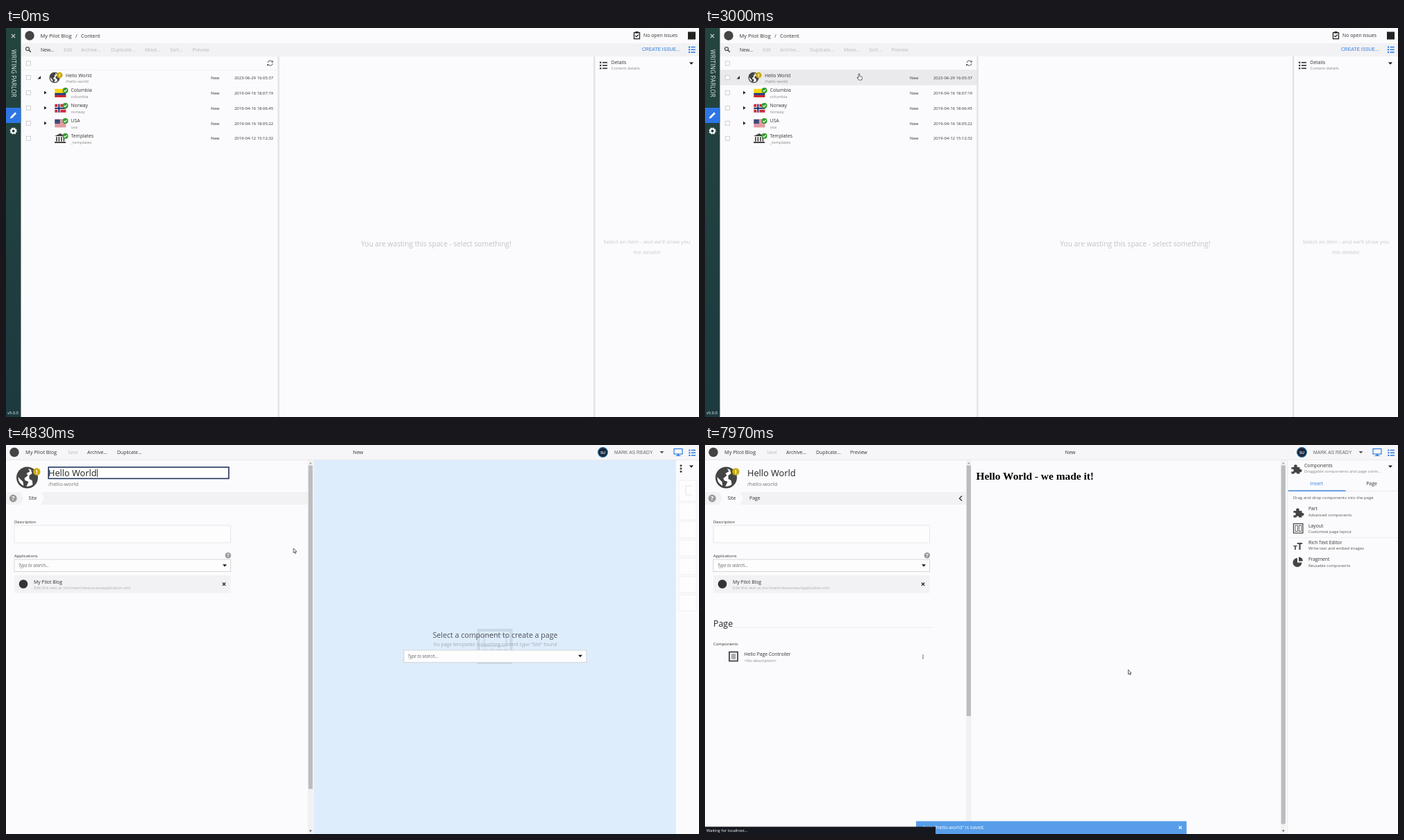
These frames come from a looping animation (998x561 px, 8 s). An HTML page:

```html
<!DOCTYPE html>
<html lang="en">
<head>
<meta charset="utf-8">
<title>Editing a page</title>
<style>
html, body { margin: 0; width: 100%; height: 100%; overflow: hidden; background: #fbfbfd; }
svg { display: block; width: 100vw; height: 100vh; }
text { font-family: "Open Sans", sans-serif; white-space: pre; }
</style>
</head>
<body>
<svg id="stage" viewBox="0 0 998 561"></svg>
<script>
const LOOP = 8000;
const BG = '#fbfbfd', BAR = '#f2f2f4', INK = '#333', DARK = '#444', MUTED = '#888', PALE = '#bbb', BLUE = '#2f7de1';
const SITE = 'My Pilot Blog';

// Markup helpers
const rect = (x, y, w, h, fill, more = '') => `<rect x="${x}" y="${y}" width="${w}" height="${h}" fill="${fill}" ${more}/>`;
const box = (x, y, w, h, stroke = '#ccc', fill = '#fdfdfe', sw = 0.8) => rect(x, y, w, h, fill, `stroke="${stroke}" stroke-width="${sw}"`);
const circle = (x, y, r, fill, more = '') => `<circle cx="${x}" cy="${y}" r="${r}" fill="${fill}" ${more}/>`;
const path = (d, fill = 'none', more = '') => `<path d="${d}" fill="${fill}" ${more}/>`;
const line = (d, stroke, w = 1) => path(d, 'none', `stroke="${stroke}" stroke-width="${w}"`);
const text = (x, y, s, size = 6.8, fill = INK, more = '') =>
  `<text x="${x}" y="${y}" font-size="${size}" fill="${fill}" ${more}>${s.replace(/</g, '&lt;')}</text>`;
const mid = 'text-anchor="middle"', end = 'text-anchor="end"';
const at = (x, y, body, scale = 1) => `<g transform="translate(${x} ${y}) scale(${scale})">${body}</g>`;
const group = (id, body) => `<g id="${id}">${body}</g>`;
const two = (x, y, a, b, gap = 8.3) => text(x, y, a) + text(x, y + gap, b, 5.85, MUTED);
const caret = (x, y, fill = '#111') => path(`M${x - 3} ${y - 1.5}h6l-3 3.2z`, fill);
const cross = (x, y, c, r = 2.2) => line(`M${x - r} ${y - r}l${2 * r} ${2 * r}m0 ${-2 * r}l${-2 * r} ${2 * r}`, c, 1.2);
const help = (x, y, r) => circle(x, y, r, '#999') + text(x, y + r * 0.6, '?', r * 1.6, '#fff', mid + ' font-weight="700"');
const arial = `style="font-family:'Liberation Sans',sans-serif"`;

// Icons
const list = (x, y, c = DARK) => [0, 4.2, 8.4].map(d =>
  rect(x, y + d, 2.4, 2.4, c) + rect(x + 4, y + d + 0.3, 7, 1.8, c)).join('');
const globe = (x, y, r) => at(x, y,
  circle(0, 0, 14, '#fff', `stroke="${DARK}" stroke-width="2.6"`) +
  path('M-12 -7C-8 -13 -2 -14 1 -13L4 -9L-1 -6L1 -3L-4 1L-3 4L2 6L0 10L-2 14L-5 12L-6 6L-10 2L-13 -1Z', DARK) +
  path('M5 -12L12 -7L14 0L12 7L8 10L7 4L3 2L3 -3L7 -6Z', DARK), r / 15.3);
const warn = (x, y, r) => circle(x, y, r, '#c9a90b') + text(x, y + r * 0.62, '!', r * 1.7, '#fff', mid + ' font-weight="700"');
const tick = (x, y) => circle(x, y, 4, '#359c2d') + line(`M${x - 2} ${y}l1.5 1.6l2.7 -3`, '#fff', 1.1);
const doc = (x, y) => box(x - 6, y - 6.5, 12, 13, DARK, '#fff', 1.8) +
  line([-3, -1, 1, 3].map(d => `M${x - 3.3} ${y + d}h6.6`).join(''), DARK, 0.9);
const user = (x, y, r) => circle(x, y, r - 0.6, '#17283c', 'stroke="#2a6da0" stroke-width="1.2"') +
  text(x, y + 2, 'SU', 5.6, '#fff', mid + ' font-weight="600"');
const puzzle = (x, y) => at(x, y, path('M-6.5 -2h4a2.4 2.4 0 1 1 4 0h4v3a2.2 2.2 0 1 1 0 4v2.5h-4a2 2 0 1 0 -4 0h-4v-3.5a2 2 0 1 0 0 -3z', DARK));
const dots = (x, y, gap, r) => [-gap, 0, gap].map(d => circle(x, y + d, r, DARK)).join('');
const temple = (x, y) => at(x, y, path('M-8 -3L0 -7L8 -3Z', DARK) + rect(-8, 5, 16, 2, DARK) +
  [-6, -2.5, 1, 4.5].map(d => rect(d, -2, 1.7, 6.5, DARK)).join(''));
const flags = {
  columbia: rect(0, 0, 16, 12, '#f8d60e') + rect(0, 6, 16, 3, '#153a8c') + rect(0, 9, 16, 3, '#cb1c30'),
  norway: rect(0, 0, 16, 12, '#d3293d') + rect(4, 0, 4, 12, '#fff') + rect(0, 4, 16, 4, '#fff') +
    rect(5, 0, 2, 12, '#16316f') + rect(0, 5, 16, 2, '#16316f'),
  usa: rect(0, 0, 16, 12, '#f4eeee') + [0, 2, 4, 6, 8, 10].map(y => rect(0, y, 16, 1, '#cc4a58')).join('') + rect(0, 0, 7.5, 6, '#3b4878')
};

// Content list
const row = (y, name, key, date, icon, kind) => {
  const root = kind === 'root', x = root ? 86 : 93.5;
  const arrow = root ? path(`M50 ${y - 2.5}v4.5h-4.5z`, '#222') : kind === 'leaf' ? '' : path(`M55 ${y - 2.5}l3.6 2.5l-3.6 2.5z`, '#222');
  return box(29.3, y - 3, 6, 6, '#c4c4c8') + arrow + icon + two(x, y - 1, name, key) +
    text(295, y + 2.2, 'New', 5.9) + text(385, y + 2.2, date, 5.95, INK, end);
};
const country = (y, name, date) => {
  const key = name.toLowerCase();
  return row(y, name, key, date, at(70.3, y - 5.5, flags[key]) + tick(85.5, y - 3.3), 'node');
};
const tools = [[83, 'Edit'], [108, 'Archive...'], [151, 'Duplicate...'], [200, 'Move...'], [236.5, 'Sort...'], [268.5, 'Preview']];
const browse =
  rect(0, 0, 998, 561, BG) + rect(21, 22, 977, 19, BAR) + rect(0, 0, 21.5, 561, 'url(#side)') +
  cross(10.5, 11.5, '#ccd6d6', 2.6) +
  text(0, 0, 'WRITING PARLOR', 8.1, '#e8eeee', 'transform="translate(7.7 31) rotate(90)" letter-spacing=".25"') +
  rect(0, 115, 21.5, 22, '#2d76e4') +
  path('M6 130.5l.7 -2.6l6.4 -6.4l2 2l-6.4 6.4z', '#fff') +
  circle(10.7, 148.5, 3, 'none', 'stroke="#fff" stroke-width="2.2"') +
  circle(10.7, 148.5, 4.5, 'none', 'stroke="#fff" stroke-width="1.2" stroke-dasharray="1.9 1.63"') +
  text(2.2, 557, 'v5.0.0', 5.7, '#fff') +
  circle(34, 11, 6.7, DARK) + text(49.5, 13.6, SITE, 7.45) + text(100, 13.6, '/', 7.4) + text(108, 13.6, 'Content', 7.4) +
  box(904.5, 6.6, 8, 9, '#222', 'none', 1.3) + rect(906.5, 5, 4, 2.5, '#222') + line('M906.3 11l1.6 1.7l3 -3.2', '#222', 1.1) +
  text(918, 13.3, 'No open issues', 6.9) + rect(982, 5.5, 11, 11, '#222') +
  circle(31, 30, 2.5, 'none', 'stroke="#444" stroke-width="1.2"') + line('M32.8 31.8l3 3', '#444', 1.5) +
  text(50, 33.6, 'New...', 6.75) + tools.map(([x, s]) => text(x, 33.6, s, 6.75, PALE)).join('') +
  text(916, 33.2, 'CREATE ISSUE...', 6.75, BLUE, arial) + at(983, 26.5, list(0, 0, BLUE), 0.88) +
  rect(22, 60, 369, 0.7, '#ececef') + box(29.3, 48, 6, 6, '#c4c4c8') +
  line('M377 50a3.6 3.6 0 0 1 6.6 -1.3m.5 2.5a3.6 3.6 0 0 1 -6.6 1.3', '#444', 0.9) +
  path('M384.6 46.8v2.8h-2.8zM376 55v-2.8h2.8z', '#444') +
  rect(22, 0, 370, 22, '#eaeaec', 'id="hover"') +
  row(71.5, 'Hello World', '/hello-world', '2023-06-29 16:05:37', globe(70, 71.5, 7.7) + warn(77.2, 68, 4.3), 'root') +
  country(93.3, 'Columbia', '2019-04-16 18:07:19') + country(115.3, 'Norway', '2019-04-16 18:06:45') +
  country(137.3, 'USA', '2019-04-16 18:05:22') +
  row(159.2, 'Templates', '_templates', '2019-04-12 15:12:32', temple(78, 159) + tick(85.5, 155.8), 'leaf') +
  rect(391.3, 41, 2.4, 520, '#e3e3e6') + rect(846, 41, 2.4, 520, '#e3e3e6') +
  text(619.5, 314.5, 'You are wasting this space - select something!', 10.2, '#c2c2c6', mid) +
  list(855, 48.6) + two(871.5, 51.7, 'Details', 'Content details') + caret(987, 51) +
  text(923, 311.2, 'Select an item - and we’ll show you', 7.75, '#cacace', mid) +
  text(923, 325.5, 'the details!', 7.75, '#cacace', mid);

const loader = rect(0, 0, 998, 561, BG) + group('skeleton',
  rect(0, 0, 998, 22, '#f4f4f6') + rect(0, 21.5, 998, 0.7, '#e6e6e8') + rect(379, 22, 0.8, 539, '#e6e6e8') +
  group('spinner', path('M-6.4 7.7A10 10 0 1 0 -10 1', 'none', 'stroke="#d2d2d8" stroke-width="1"') +
    path('M-3 -9.5A10 10 0 1 1 -7 7.1', 'none', 'stroke="#909098" stroke-width="1.9"')));

// Editor
const placeholder = (x, y) => text(x, y, 'Type to search...', 6.2, '#666', 'font-style="italic"');
const controller = (x, y) => two(x, y, 'Hello Page Controller', '<No description>');
const bar = (x, h) => rect(x, 22, 7.5, 539, '#f1f1f2') + path(`M${x + 2} 27.3h3.6l-1.8 -2.3z`, '#999') +
  rect(x + 0.7, 29.5, 6.2, h, '#bcbcbe') + path(`M${x + 2} 555.6h3.6l-1.8 2.3z`, '#555');
const form =
  globe(30.5, 47, 15.5) + warn(44.3, 38.5, 5.2) +
  rect(61.2, 32, 259.6, 16.4, '#fff', 'id="focus" stroke="#22355f" stroke-width="1.6"') +
  text(61, 45, 'Hello World', 12.75, '#222') + rect(131, 34.5, 0.8, 11.5, '#111', 'id="caret"') +
  text(61, 59.3, '/hello-world', 7.7, '#777') +
  rect(0, 68, 435, 18, BAR, 'id="tabs"') + path('M20 68H50L55 77L50 86H20L25 77Z', BG) + help(10.3, 77, 5.4) +
  text(32.5, 79.4, 'Site', 6.9) +
  text(12, 113.3, 'Description', 5.85) + box(12, 116, 311.5, 25, '#e2e2e5') +
  text(12, 162, 'Applications', 5.9) + help(319.8, 159.2, 4.2) +
  box(12, 165, 311.5, 17.5) + placeholder(18, 176) + caret(315, 173.7) +
  rect(12, 188, 311.5, 25.5, BAR) + circle(25, 200.5, 6.3, '#333') +
  text(40, 199.5, SITE, 6.8) + text(40, 207.6, 'Edit this text at /src/main/resources/application.xml', 5.8, '#aaa') +
  cross(314, 200.7, '#222');
const pageForm = text(209, 13, 'Preview', 6.85) + text(64, 79.4, 'Page', 6.9) +
  text(12, 262.4, 'Page', 12.4, '#222') + rect(42, 262.6, 288, 0.7, '#e4e4e6') +
  text(12, 289.4, 'Components', 5.9) + doc(41, 305) + controller(56.5, 304.2) + dots(314, 305.5, 2.2, 0.8);

const chooser =
  box(-24, 267, 47, 47, '#cbd8e6', 'none', 4) + rect(-16, 274, 32, 16, 'none', 'stroke="#cfdbe8" stroke-width="2.5"') +
  [-18, -8, 2, 12].map(x => rect(x, 294, 7, 7, '#cfdbe8')).join('') +
  group('heading', text(0, 277.6, 'Select a component to create a page', 10.65, '#4c5058', mid) +
    text(0, 289.8, 'No page templates supporting content type "Site" found', 6.82, '#a3a9b0', mid)) +
  group('search', box(-131.5, 296, 263, 17.7) + placeholder(-126, 307) + caret(122.5, 304.3)) +
  group('option', box(-131.5, 313.7, 263, 23) + doc(-118.5, 325.2) + controller(-103.5, 324.5)) +
  group('chosen', box(-131, 293, 262.5, 23) + doc(-118.5, 304.7) + controller(-103.5, 304) +
    box(114.7, 293.8, 16.2, 21.6, '#222', '#fff', 1.2) + text(122.7, 305, '...', 6, BLUE, mid));

const cards = (x, w, spans) => spans.map(([y, h]) => box(x, y, w, h, '#ebebee')).join('');
const props = [['Id', '9038a78a-210d-4199-b17a-315...'], ['Type', 'site'], ['Application', 'portal'],
  ['Created', '2019-04-12 15:12:32'], ['Modified', '2023-06-29 16:05:37'], ['Language', 'en'], ['Owner', 'su']];
const link = (y, s) => text(919, y, s, 5.95, BLUE, mid + ' text-decoration="underline"');
const slim = rect(965, 22, 33, 539, BG) + dots(972, 34, 4.2, 1.5) + caret(987, 31) +
  cards(969, 25, [[51, 30], [83, 25], [110, 24], [137, 23], [163, 24], [190, 23], [216, 23]]) +
  line('M988 59h-9v13h9', '#e4e4e8', 1);
const pane = rect(838.5, 22, 160, 539, BG) + rect(838.5, 22, 0.8, 539, '#e4e4e7') + caret(987, 31);
const details = pane + list(846, 28.8) + two(863, 32.2, 'Details', 'Content details') +
  cards(844, 150, [[51, 31], [85.5, 24], [113, 55.5], [172.5, 88.5], [265, 27], [296, 27.5]]) +
  globe(859.5, 66.5, 6.8) + warn(865, 64, 3.2) + two(872, 65, 'Hello World', '/hello-world') +
  text(919, 101, 'NEW', 9.4, '#222', mid) +
  rect(875, 124, 6, 5, '#333') + line('M880 124v-1.5a1.6 1.6 0 0 1 3.2 0v1.5', '#333', 1) +
  text(887, 127.6, 'Everyone can read this item', 5.8, '#666') +
  user(856, 143.7, 7) + text(988, 146.3, 'Full Access', 6.9, INK, end) + link(160.8, 'Edit Permissions') +
  props.map(([k, v], i) => text(894, 183.4 + i * 9.77, k, 5.8, '#777', end) + text(899, 183.4 + i * 9.77, v, 5.85)).join('') +
  link(253.8, 'Edit Settings') + text(919, 281, 'Page Template is not used', 6, INK, mid) +
  text(919, 312, 'This item has no attachments', 6, INK, mid);

const parts = [['Part', 'Advanced components'], ['Layout', 'Customize page layout'],
  ['Rich Text Editor', 'Write text and embed images'], ['Fragment', 'Reusable components']];
const insert = pane + puzzle(851, 34) + two(863, 32, 'Components', 'Draggable components and page contr...', 8.4) +
  text(881, 58.2, 'Insert', 6.9, BLUE, mid) + text(960, 58.2, 'Page', 6.9, INK, mid) +
  rect(839, 66, 159, 0.7, '#e2e2e5') + rect(840, 65.3, 82.5, 1.4, BLUE) +
  text(847, 78.3, 'Drag and drop components into the page', 6, '#555') +
  parts.map(([a, b], i) => text(869, 94.2 + i * 24.4, a) + text(869, 102.5 + i * 24.4, b, 5.85, '#555')).join('') +
  puzzle(854, 97) + box(847.5, 113.5, 13.5, 13.5, DARK, 'none', 1.2) +
  [850, 855.5].map(x => box(x, 116, 3.4, 8.5, DARK, 'none', 0.8)).join('') +
  rect(839, 133, 159, 0.6, '#e8e8eb') +
  text(847, 150.5, 'т', 11, DARK, 'font-weight="700"') + text(852.5, 150.8, 'T', 14, DARK, 'font-weight="700"') +
  path('M853 163a6.5 6.5 0 1 0 6.5 6.5h-6.5z', DARK) + path('M855 161.5a6 6 0 0 1 6 6h-6z', DARK);

const editor = rect(0, 0, 998, 561, BG) + rect(0, 0, 998, 21.5, '#f6f6f8') + rect(0, 21.3, 998, 0.8, '#e4e4e7') +
  circle(12, 10.5, 6.7, DARK) + text(28, 13.2, SITE, 7.45) + text(89, 13, 'Save', 6.85, PALE) +
  text(117, 13, 'Archive...', 6.85) + text(160, 13, 'Duplicate...', 6.85) + text(507, 13.2, 'New', 7.2, INK, mid + ' id="state"') +
  user(859.5, 10.5, 7.5) + text(876, 12.8, 'MARK AS READY', 6.8, '#666', arial) + caret(944.5, 10.5, '#555') +
  box(962, 5.5, 12, 7.5, BLUE, 'none', 1.2) + rect(966.8, 13, 2.5, 2.5, BLUE) + rect(964.5, 15, 7, 1, BLUE) + at(983.3, 6.5, list(0, 0, BLUE), 0.88) +
  form + line('M370 73.5l-3.6 3.5l3.6 3.5', '#333', 1.3).replace('<path', '<path id="chevron"') +
  group('canvas', rect(0, 22, 998, 539, '#deedfc')) + group('chooser', chooser) +
  group('slim', bar(434.7, 466.5) + slim) + group('wide', bar(376, 466.5) + details) +
  group('built', rect(376, 22, 463, 539, BG) + bar(376, 361.5) + bar(829, 517) + pageForm + insert +
    text(390.5, 50, 'Hello World - we made it!', 15.4, '#000', `font-weight="700" style="font-family:'Liberation Serif',serif"`));

const toast = rect(304, 0, 389.5, 20, '#579de9', 'id="toastBox"') +
  group('toastText', text(313.5, 2.6, 'Item "hello-world" is saved.', 7.05, '#fff') + cross(684.5, 0, '#fff'));
const status = rect(0, 550.5, 332, 10.5, '#161820', 'id="statusBox"') + text(2, 557.8, 'Waiting for localhost...', 5.75, '#fff');
const outline = 'stroke="#222" stroke-width=".7" stroke-linejoin="round"';
const cursors =
  group('arrow', path('M0 0v6.6l1.5 -1.4l1 2.3l1.1 -.5l-1 -2.2h2z', '#fff', outline)) +
  group('hand', path('M-.9 .7a.8 .8 0 0 1 1.6 0v2.8l3 .8q.8 .3 .6 1.4l-.6 3.3h-4.2l-2.3 -3q-.3 -1 .7 -.8l1.2 .8z', '#fff', outline)) +
  group('beam', line('M-1.6 0h3.2M0 0v7M-1.6 7h3.2', '#444', 0.9));

const stage = document.getElementById('stage');
stage.innerHTML =
  '<defs><linearGradient id="side" x1="0" y1="0" x2="0" y2="1"><stop stop-color="#24443f"/><stop offset="1" stop-color="#1d3a40"/></linearGradient></defs>' +
  group('browse', browse) + group('loader', loader) + group('editor', editor) + group('toast', toast) + group('status', status) + cursors;

const el = {};
stage.querySelectorAll('[id]').forEach(n => { el[n.id] = n; });
const show = (id, on) => { el[id].style.display = on ? '' : 'none'; };
const set = (id, name, value) => el[id].setAttribute(name, value);
const move = (id, x, y) => set(id, 'transform', `translate(${x} ${y})`);
const clamp = v => Math.max(0, Math.min(1, v));
const ease = p => p * p * (3 - 2 * p);

// Pointer path: time, x, y
const route = [[700, 860, 374], [1000, 556, 354], [1270, 556, 354], [2070, 216, 101], [2100, 216, 101], [2530, 222, 66],
  [4070, 222, 66], [4270, 278, 133.5], [4310, 278, 133.5], [4590, 414, 149], [4900, 414, 149], [5560, 732, 306.5],
  [5960, 732, 306.5], [6580, 609.5, 324]];

function pointer(t) {
  let [, x, y] = route[0];
  for (let i = 1; i < route.length; i++) {
    const [t0, x0, y0] = route[i - 1], [t1, x1, y1] = route[i];
    if (t < t0) break;
    const p = ease(clamp((t - t0) / (t1 - t0)));
    x = x0 + (x1 - x0) * p;
    y = y0 + (y1 - y0) * p;
  }
  return [x, y];
}

function cursorKind(t, x, y, hovered) {
  if (t < 700) return '';
  if (t < 3100) return hovered ? 'hand' : 'arrow';
  if (t < 4570) return t < 4070 ? 'arrow' : 'beam';
  if (t < 5900) return x > 722 && y > 294 ? 'hand' : 'arrow';
  return t < 6830 ? 'hand' : 'arrow';
}

function render(t) {
  const [x, y] = pointer(t);
  const line = Math.floor((y + 4 - 60.5) / 22);
  const hovered = t >= 1270 && x < 391 && line >= 0 && line < 5;
  const opened = t >= 4570, wide = t >= 4890, focus = t < 5900, chosen = t >= 6830, built = t >= 7400;

  show('browse', t < 3100);
  show('loader', t >= 3100 && !opened);
  show('editor', opened);
  show('hover', hovered);
  set('hover', 'y', 60.5 + line * 22);

  show('skeleton', t >= 4070);
  set('spinner', 'transform', `translate(499 280) rotate(${(t - 4300) * 0.36})`);

  show('slim', !wide);
  show('wide', wide && !built);
  show('built', built);
  show('chevron', wide);
  show('focus', focus);
  show('caret', focus && Math.floor((t - 4580) / 500) % 2 === 0);
  set('tabs', 'width', wide ? 376 : 435);
  set('state', 'x', built ? 526 : 507);
  move('canvas', wide ? 385.5 : 443, 0);
  move('chooser', wide ? 611.5 : 704.5, 0);
  move('heading', 0, chosen ? -2.6 : 0);
  show('search', !chosen);
  show('option', t >= 5960 && !chosen);
  show('chosen', chosen);

  const h = 18.5 * clamp((t - 6925) / 140);
  show('toast', h > 0);
  set('toastBox', 'y', 561 - h);
  move('toastText', 0, 561 - h / 2);
  show('toastText', h > 6);

  show('status', (t >= 3600 && t < 4750) || t >= 7500);
  set('statusBox', 'fill', opened && t < 5000 ? '#58585c' : '#161820');
  set('status', 'opacity', opened && t < 5000 ? 1 - clamp((t - 4630) / 120) : 1);

  const kind = cursorKind(t, x, y, hovered);
  for (const id of ['arrow', 'hand', 'beam']) {
    show(id, id === kind);
    move(id, x, y);
  }
}

const start = performance.now();
function tick0() {
  render((performance.now() - start) % LOOP);
  requestAnimationFrame(tick0);
}
tick0();
</script>
</body>
</html>
```
